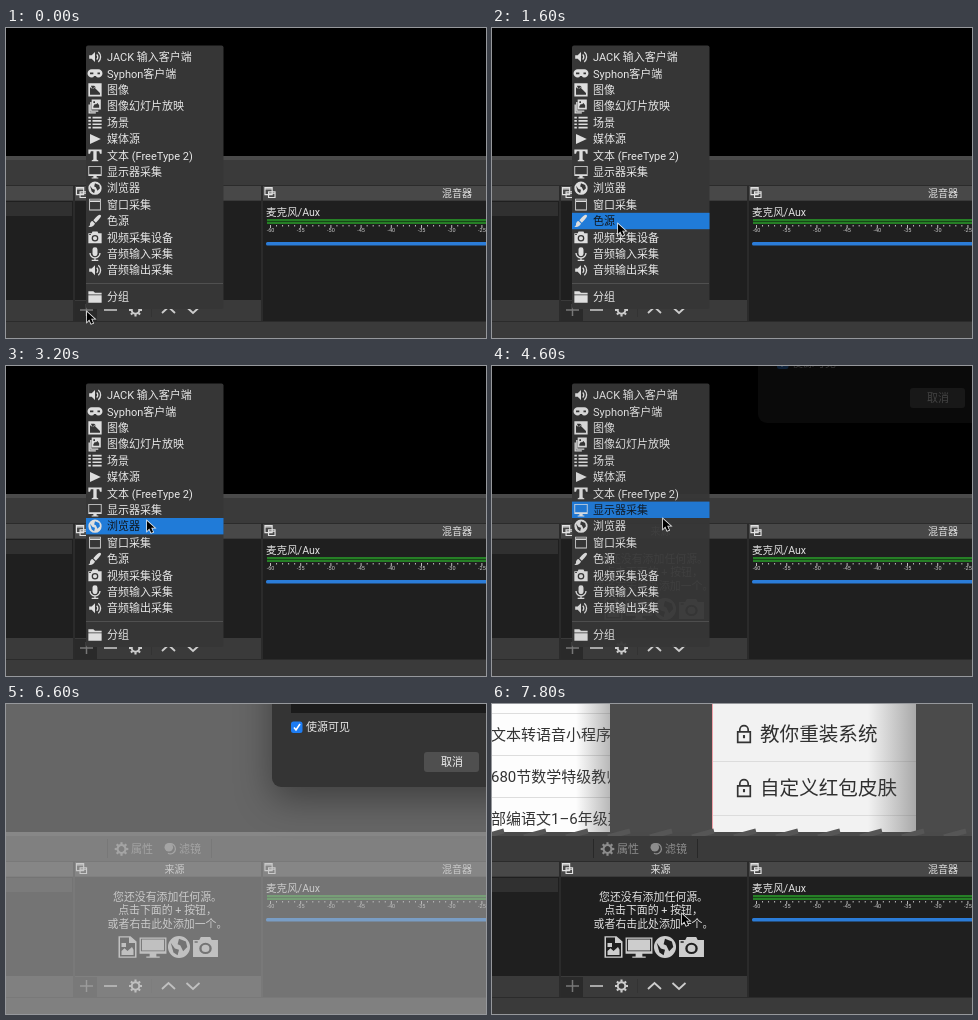
Recreate the animation shown at these times as an HTML page with a canvas. Size 480x310 px, loop 8 s.

```html
<!DOCTYPE html>
<html lang="zh">
<head>
<meta charset="utf-8">
<style>
html, body { margin: 0; width: 100%; height: 100%; overflow: hidden; background: #000; }
canvas { display: block; }
</style>
</head>
<body>
<canvas id="stage" width="480" height="310"></canvas>
<script>
const ctx = document.getElementById('stage').getContext('2d');
const FONT = 'Roboto, "Noto Sans CJK SC", "Noto Sans CJK", sans-serif';
const LOOP = 8000, STEP = 200;

// Icons live in a 16 x 16 box around the origin.
const ICONS = {
  speaker: { fill: 'M-7-2h3l4-4v12l-4-4h-3z', line: 'M2-3a4 4 0 0 1 0 6M4-6a8 8 0 0 1 0 12' },
  pad: { fill: 'M-4-5h8a5 5 0 0 1 0 10q-2 0-3-2h-2q-1 2-3 2a5 5 0 0 1 0-10zM-6-1h4v2h-4zM3-1h3v2h-3z' },
  image: { fill: 'M-8-8h16v16h-16zM-6 6h12v-2l-7-7-2 2-3-2zM-5-5l4 0 2 2-4 2z' },
  slides: { fill: 'M-4-8h11v12h-11zM-2 2h7v-3l-2-3-2 2-1-1-2 3zM-2-6h2v2h-2z', line: 'M-5-5v11h9M-7-2v10h8' },
  list: { fill: 'M-8-7h3v2h-3zM-3-7h11v2h-11zM-8-3h3v2h-3zM-3-3h11v2h-11zM-8 1h3v2h-3zM-3 1h11v2h-11zM-8 5h3v2h-3zM-3 5h11v2h-11z' },
  play: { fill: 'M-6-6l13 6-13 6z' },
  letter: { fill: 'M-8-7h16v5h-2l-1-3h-3v10l2 1v1h-8v-1l2-1v-10h-3l-1 3h-2z' },
  monitor: { fill: 'M-8-7h16v12h-6v2h2v1h-8v-1h2v-2h-6zM-7-6v9h14v-9z' },
  screen: { fill: 'M-8-7h16v12h-6v2h2v1h-8v-1h2v-2h-6zM-7.2-6.2v9.4h14.4v-9.4zM-6.6-5.6h13.2v8.2h-13.2z' },
  globe: { fill: 'M-8 0a8 8 0 0 1 16 0a8 8 0 0 1-16 0zM-6-3l3 4 3 1-1 4-3-2zM0-6l5 2 1 4-3 3-2-4-2-1z' },
  window: { fill: 'M-7-7h14v14h-14zM-6-3v9h12v-9zM-6-6v1h12v-1z' },
  brush: { fill: 'M7-7q2 1-6 9l-3-3q7-8 9-6zM-3 0l3 3q-2 5-8 4 3-2 2-4 1-3 3-3z' },
  camera: { fill: 'M-8-5h4l1-2h6l1 2h4v12h-16zM-4 1a4 4 0 0 0 8 0a4 4 0 0 0-8 0zM-2.5 1a2.5 2.5 0 0 0 5 0a2.5 2.5 0 0 0-5 0zM-7-4h2v1h-2z' },
  mic: { fill: 'M-3-5a3 3 0 0 1 6 0v5a3 3 0 0 1-6 0z', line: 'M-6-1a6 6 0 0 0 12 0M0 5v3M-4 8h8' },
  folder: { fill: 'M-8-7h6l2 2h8v2h-16zM-8-2h16v9h-16z' },
  photo: { fill: 'M-6-8h8l4 4v12h-12zM-5-7v14h10v-10h-4v-4zM-4 6v-3l2-2 2 2 3-3 1 2v4zM-4-3h3v3h-3z' },
  dock: { line: 'M-7-7h10v10h-10zM-7-5h10M-2-1h9v8h-9zM-2 1h9' },
  filter: { fill: 'M-7-2a5 5 0 0 1 10 0a5 5 0 0 1-10 0z', line: 'M-2-6a6 6 0 1 1-1 11' },
  lock: { fill: 'M-1 1h2v3h-2z', line: 'M-6-2h12v10h-12zM-4-2v-2a4 4 0 0 1 8 0v2' },
};
for (const icon of Object.values(ICONS))
  for (const part in icon) icon[part] = new Path2D(icon[part]);

const MENU = [
  ['speaker', 'JACK 输入客户端'], ['pad', 'Syphon客户端'], ['image', '图像'],
  ['slides', '图像幻灯片放映'], ['list', '场景'], ['play', '媒体源'],
  ['letter', '文本 (FreeType 2)'], ['monitor', '显示器采集'], ['globe', '浏览器'],
  ['window', '窗口采集'], ['brush', '色源'], ['camera', '视频采集设备'],
  ['mic', '音频输入采集'], ['speaker', '音频输出采集'], ['folder', '分组'],
].map(([icon, label], i) => ({ icon, label, y: i < 14 ? 29 + i * 16.4 : 269 }));

// Keyframes: time, then values.
const CURSOR = [
  [0, 81, 284], [200, 81, 284], [400, 86, 268], [600, 104, 225], [800, 122, 145],
  [1000, 132, 79], [1200, 134, 112], [1400, 129, 166], [1600, 126, 196], [2000, 134, 205],
  [2400, 140, 166], [2600, 141, 172], [2800, 142, 198], [3200, 141, 155], [3600, 146, 147],
  [4000, 162, 147], [4600, 171, 153], [5000, 181, 182], [5200, 190, 190], [5600, 300, 140],
  [6000, 440, 80], [6400, 474, 70], [6600, 490, 72], [7200, 490, 90], [7400, 400, 130],
  [7600, 250, 190], [7800, 190, 210],
];
const MENU_ALPHA = [[4400, 1], [4600, .95], [4800, .3], [5000, 0]];
const WASH = [[4600, 0], [4800, .28], [5000, .478], [5200, .555], [7000, .555], [7200, .3], [7400, 0]];
const SHEET = [
  [4400, -40, 0], [4600, -26, .2], [4800, -9, .75], [5000, -1.5, 1], [5200, 0, 1],
  [7000, 0, 1], [7200, -12, .6], [7400, -34, 0],
];

function track(keys, t) {
  const next = keys.findIndex(k => k[0] > t);
  if (next === 0) return keys[0].slice(1);
  if (next < 0) return keys[keys.length - 1].slice(1);
  const a = keys[next - 1], b = keys[next], p = (t - a[0]) / (b[0] - a[0]);
  return a.slice(1).map((v, i) => v + (b[i + 1] - v) * p);
}

function rect(x, y, w, h, color) {
  ctx.fillStyle = color;
  ctx.fillRect(x, y, w, h);
}

function round(x, y, w, h, r, color) {
  ctx.fillStyle = color;
  ctx.beginPath();
  ctx.roundRect(x, y, w, h, r);
  ctx.fill();
}

function text(str, x, midY, size, color, align = 'left') {
  ctx.font = `${size}px ${FONT}`;
  ctx.textAlign = align;
  ctx.fillStyle = color;
  ctx.fillText(str, x, midY + size * .38);
}

function path(points, color, width) {
  ctx.strokeStyle = color;
  ctx.lineWidth = width;
  ctx.beginPath();
  for (const [x, y] of points) ctx.lineTo(x, y);
  ctx.stroke();
}

function icon(name, x, y, sx, color, sy = sx) {
  const { fill, line } = ICONS[name];
  ctx.save();
  ctx.translate(x, y);
  ctx.scale(sx, sy);
  ctx.fillStyle = ctx.strokeStyle = color;
  ctx.lineWidth = 1.6;
  if (fill) ctx.fill(fill, 'evenodd');
  if (line) ctx.stroke(line);
  ctx.restore();
}

function gear(x, y, r, color) {
  ctx.save();
  ctx.translate(x, y);
  ctx.strokeStyle = color;
  ctx.lineWidth = r * .3;
  ctx.beginPath();
  ctx.arc(0, 0, r * .58, 0, 7);
  ctx.stroke();
  for (let i = 0; i < 8; i++) {
    ctx.rotate(Math.PI / 4);
    rect(r * .65, -r * .16, r * .35, r * .32, color);
  }
  ctx.restore();
}

function fade(x0, x1, from, to) {
  const g = ctx.createLinearGradient(x0, 0, x1, 0);
  g.addColorStop(0, from);
  g.addColorStop(1, to);
  rect(x0, 0, x1 - x0, 128, g);
}

function capturedScreen() {
  ctx.save();
  ctx.beginPath();
  ctx.rect(0, 0, 480, 132);
  ctx.clip();
  rect(0, 0, 480, 128, '#4b4b4b');
  rect(0, 0, 118, 128, '#fdfdfd');
  ['文本转语音小程序', '680节数学特级教师', '部编语文1–6年级期末'].forEach((s, i) => {
    text(s, -1, 30 + i * 42, 15, '#333');
    rect(0, 9 + i * 42, 118, 1, '#ddd');
  });
  fade(84, 118, 'rgba(80,80,80,0)', 'rgba(80,80,80,.4)');
  rect(118, 0, 102, 128, '#4b4b4b');
  rect(220, 0, 204, 128, '#f2f2f2');
  rect(220, 0, 1, 128, '#f0a0a8');
  ['教你重装系统', '自定义红包皮肤'].forEach((s, i) => {
    const y = 30 + i * 54;
    icon('lock', 252, y, 1.05, '#333');
    text(s, 268, y, 19.6, '#303030');
    rect(221, y + 27, 203, 1, '#dcdcdc');
  });
  fade(376, 424, 'rgba(80,80,80,0)', 'rgba(80,80,80,.45)');
  rect(424, 0, 56, 128, '#4b4b4b');
  for (let x = -10; x < 480; x += 42) path([[x, 133], [x + 22, 127]], '#565656', 5);
  ctx.restore();
}

function sourcesDock() {
  const white = '#e2e2e2', pale = '#cdcdcd';
  icon('dock', 75.5, 164.5, .72, white);
  text('来源', 168.5, 165, 10, white, 'center');
  ['您还没有添加任何源。', '点击下面的 + 按钮，', '或者右击此处添加一个。']
    .forEach((s, i) => text(s, 161.5, 193 + i * 13.2, 10.9, white, 'center'));
  icon('photo', 121.5, 243, 1.5, pale, 1.35);
  icon('screen', 147, 243, 1.68, pale, 1.35);
  icon('globe', 173, 243, 1.38, pale);
  icon('camera', 199.5, 243, 1.56, pale, 1.42);

  rect(69, 273, 22, 20, '#2a2a2a');
  path([[74, 282], [87, 282]], '#777', 1.5);
  path([[80.5, 276], [80.5, 288]], '#777', 1.5);
  path([[98, 282], [111, 282]], pale, 1.5);
  gear(129.5, 282, 6.5, pale);
  rect(145, 275, 1, 14, '#333');
  path([[156, 285], [162.5, 279], [169, 285]], pale, 1.8);
  path([[180.5, 279], [187, 285], [193.5, 279]], pale, 1.8);
}

function mixerDock() {
  icon('dock', 264, 164.5, .72, '#e2e2e2');
  text('混音器', 451, 165, 10, '#e2e2e2', 'center');
  text('麦克风/Aux', 260, 183.5, 10.6, '#e2e2e2');
  rect(261, 191, 219, 5, '#174617');
  rect(261, 191, 219, 2, '#267f26');
  rect(261, 194, 219, 2, '#267f26');
  for (let i = 0; i < 37; i++) rect(264 + i * 6.04, 197, 1, i % 5 ? 1.5 : 3, '#bbb');
  for (let i = 0; i < 8; i++) text(String(i * 5 - 60), 264.5 + i * 30.2, 202, 5.5, '#ccc', 'center');
  round(260, 214, 224, 3.5, 1.5, '#2b7cd8');
}

function mainWindow(t) {
  rect(0, 0, 480, 310, '#3a3a3a');
  rect(0, 0, 480, 128, '#000');
  rect(0, 128, 480, 4, '#4a4a4a');
  if (t >= 7400) capturedScreen();

  rect(101, 135, 1, 19, '#282828');
  rect(205, 135, 1, 19, '#282828');
  gear(115.5, 145, 6.8, '#8d8d8d');
  text('属性', 125, 145, 11, '#8d8d8d');
  icon('filter', 164.5, 145, .85, '#8d8d8d');
  text('滤镜', 173, 145, 11, '#8d8d8d');

  rect(0, 157, 480, 1, '#2b2b2b');
  for (const [x, w] of [[0, 67], [69, 187], [257, 223]]) {
    rect(x, 158, w, 14, '#484848');
    rect(x, 173, w, x === 257 ? 120 : 99, '#1f1f1f');
  }
  rect(0, 174, 66, 14, '#303030');
  rect(67, 158, 2, 135, '#2b2b2b');
  rect(255, 158, 2, 135, '#2b2b2b');
  rect(0, 293, 480, 1, '#2b2b2b');
  sourcesDock();
  mixerDock();
}

function menu(active) {
  round(80, 17.5, 137.5, 263.5, 2, '#363636');
  rect(80, 255, 137, 1, '#505050');
  MENU.forEach((item, i) => {
    if (i === active) rect(80, item.y - 8.2, 137.5, 16.4, '#207bd8');
    icon(item.icon, 89, item.y, .83, '#dedede');
    text(item.label, 101, item.y, 11, i === active ? '#10161d' : '#e6e6e6');
  });
}

function sheet(dy) {
  ctx.translate(0, dy);
  ctx.shadowColor = 'rgba(0,0,0,.38)';
  ctx.shadowBlur = 36;
  ctx.shadowOffsetY = 12;
  round(266, -60, 260, 143, 9, '#343434');
  ctx.shadowColor = 'transparent';
  rect(285, -40, 195, 49, '#1b1b1b');
  round(285, 17.5, 11.5, 11.5, 2.5, '#1d7cf2');
  path([[288, 23.5], [290, 26], [294, 20]], '#fff', 1.6);
  text('使源可见', 300, 23, 11, '#e8e8e8');
  round(418, 48, 55, 20, 3, '#4f4f4f');
  text('取消', 446, 58, 11, '#f2f2f2', 'center');
}

function pointer(x, y) {
  const shape = new Path2D('M0 0v13l3-3 2.5 5.5 2.5-1-2.5-5.5h4.5z');
  ctx.translate(x, y);
  ctx.scale(.76, .76);
  ctx.lineWidth = 2;
  ctx.strokeStyle = '#f0f0f0';
  ctx.stroke(shape);
  ctx.fillStyle = '#000';
  ctx.fill(shape);
}

function layer(alpha, paint) {
  if (alpha <= 0) return;
  ctx.save();
  ctx.globalAlpha = alpha;
  paint();
  ctx.restore();
}

function draw(now) {
  const t = Math.floor((now % LOOP) / STEP) * STEP;
  const [x, y] = track(CURSOR, t);
  const [dy, sheetAlpha] = track(SHEET, t);
  const hovered = MENU.findIndex(item => Math.abs(item.y - y) <= 8.2);

  mainWindow(t);
  layer(track(MENU_ALPHA, t)[0], () => menu(t >= 4000 ? 7 : hovered));
  layer(track(WASH, t)[0], () => rect(0, 0, 480, 310, '#b8b8b8'));
  layer(sheetAlpha, () => sheet(dy));
  layer(1, () => pointer(x, y));
}

const start = performance.now();
function tick() {
  draw(performance.now() - start);
  requestAnimationFrame(tick);
}
tick();
</script>
</body>
</html>
```
